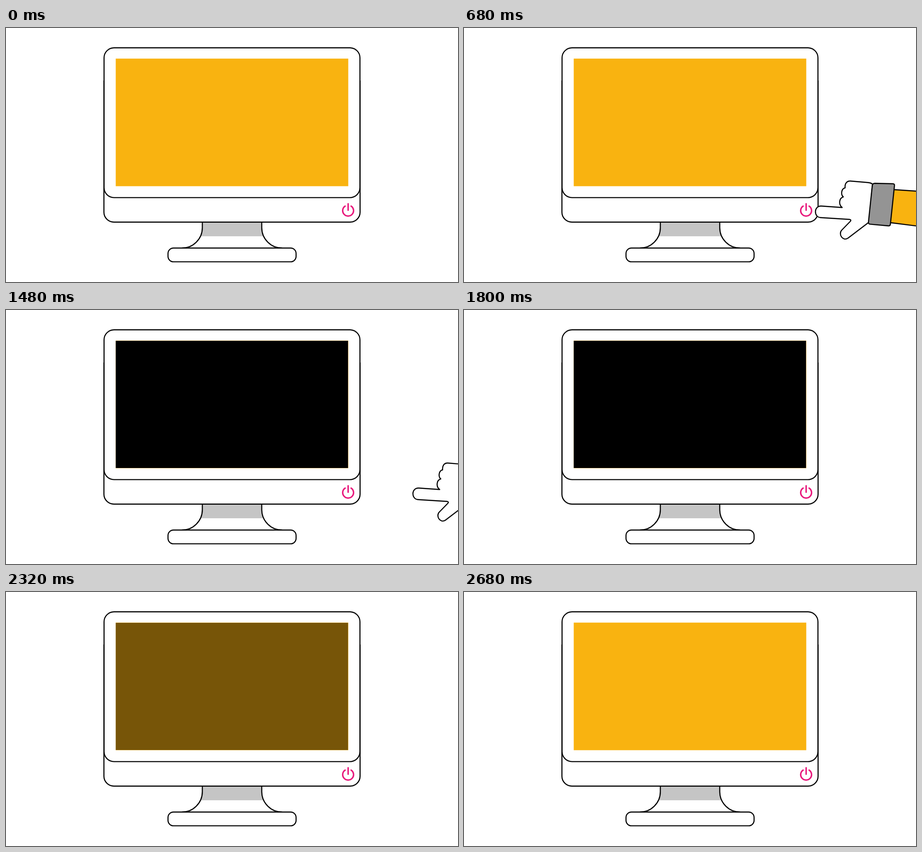
Write an HTML page that moves like this. It is 998x561 px and loops after 3000 ms.

```html
<!DOCTYPE html>
<html lang="en">
<head>
<meta charset="utf-8">
<title>Power button</title>
<style>
  html, body { margin: 0; height: 100%; overflow: hidden; background: #fff; }
  svg { display: block; width: 100vw; height: 100vh; }
  .line { fill: #fff; stroke: #000; stroke-width: 2.4; stroke-linejoin: round; }
  .power { fill: none; stroke: #e8197c; stroke-width: 3.2; stroke-linecap: round; }
</style>
</head>
<body>
<svg viewBox="0 0 998 561">
  <!-- stand -->
  <path fill="#c5c5c5" d="M433.5 429V441A45 45 0 0 1 429.3 460H569A45 45 0 0 1 564.7 441V429Z"/>
  <path class="line" style="fill:none" d="M433.5 429V441A45 45 0 0 1 388.5 486M564.7 429V441A45 45 0 0 0 609.7 486"/>
  <rect class="line" x="357.7" y="486" width="282.8" height="30.4" rx="12"/>

  <!-- monitor -->
  <path class="line" d="M216.2 116V407A22 22 0 0 0 238.2 428.7H759.8A22 22 0 0 0 781.8 407V116"/>
  <rect class="line" x="216.5" y="43.8" width="565" height="330.8" rx="22"/>
  <rect x="242.3" y="67.6" width="513.4" height="281.8" fill="#f9b310"/>
  <rect id="dark" x="242.3" y="68" width="512.9" height="281"/>
  <path class="power" d="M748.8 393.4A12 12 0 1 0 762 393.4M755.4 388.2V402.5"/>

  <!-- arm -->
  <g id="arm">
    <path class="line" style="fill:#f9b310" d="M946 356.8L1060 364.5V445L938 429.5Z"/>
    <path class="line" d="M902 345Q899 341.8 891 341.2L853 338C845 337.6 840.5 344 841.5 353C833 355 831.5 368 837.5 373C828 376 826.5 390 835 396.5L789 393.3C772 392.5 772 417.5 787 418.7L851 422.7Q856 423.5 853 427L834 446.5C826 455 836 472 848 464L894 429Z"/>
    <path class="line" style="fill:#949494" d="M907 343L947 344Q951 344.2 950.5 348L941.5 433Q941 437.5 937 437L897 433.4Q892.5 433 893 428.5L901.5 348Q902.3 343 907 343Z"/>
  </g>
</svg>
<script>
  const LOOP = 3000, STEP = 40, TRAVEL = 256;
  const arm = document.getElementById('arm');
  const dark = document.getElementById('dark');
  const clamp = v => Math.min(1, Math.max(0, v));
  const ease = v => (1 - Math.cos(Math.PI * clamp(v))) / 2;

  function draw(now) {
    const t = Math.floor(now % LOOP / STEP) * STEP;
    // distance of the finger from the pressed position
    const away = TRAVEL * (1 - ease(t / 860) + ease((t - 1010) / 850));
    arm.setAttribute('transform', `translate(${away - 26.7})`);
    dark.setAttribute('opacity', t < 1040 ? 0 : 1 - clamp((t - 2003) / 664));
  }

  let start;
  function tick(now) {
    start ??= now;
    draw(now - start);
    requestAnimationFrame(tick);
  }
  draw(0);
  requestAnimationFrame(tick);
</script>
</body>
</html>
```
